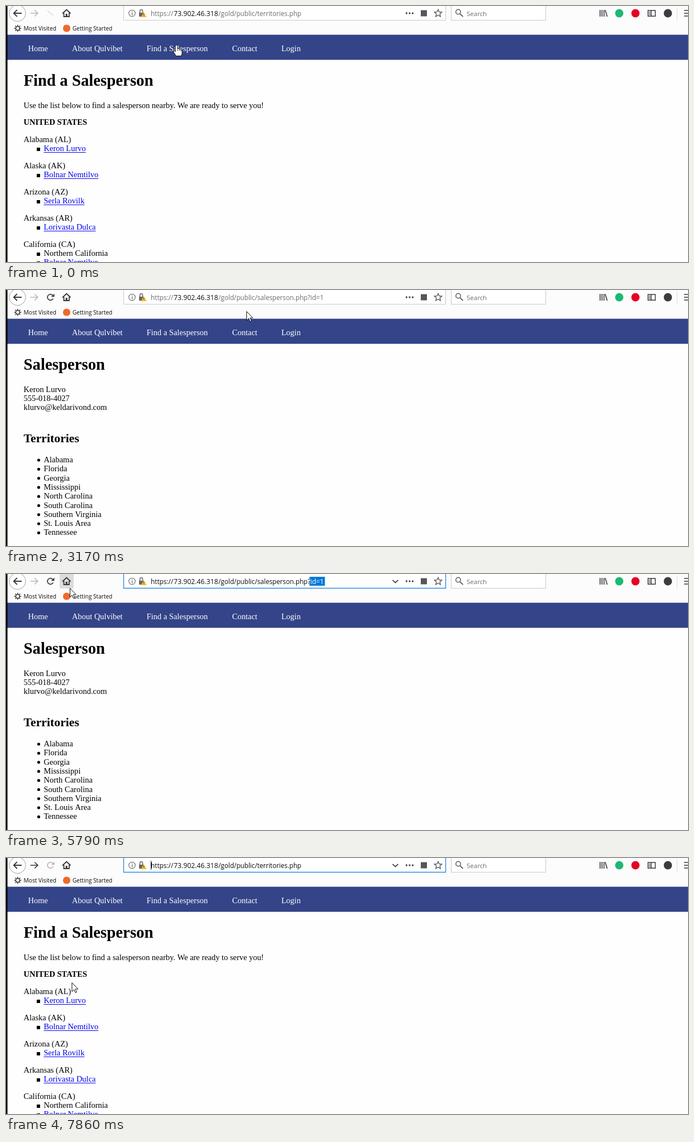
Write an HTML page with a canvas that moves like this. It is 1220 px wide and 459 px high and loops after 8 s.

```html
<!DOCTYPE html>
<html lang="en">
<head>
<meta charset="utf-8">
<title>Find a Salesperson</title>
<style>
html, body { margin: 0; width: 100%; height: 100%; overflow: hidden; background: #fefefe; }
canvas { display: block; }
</style>
</head>
<body>
<canvas id="stage" width="1220" height="459"></canvas>
<script>
const ctx = document.getElementById('stage').getContext('2d');
const LOOP = 8000;
const SERIF = '"Liberation Serif", serif';
const SANS = '"Open Sans", sans-serif';
const DARK = '#38383d', GREY = '#b8b8bb', BLUE = '#0078d7';

// Step tables: each row holds from its time until the next row.
const CURSOR = [
  [0, 305, 70, 'hand'], [150, 245, 112, 'arrow'], [290, 168, 158, 'arrow'],
  [430, 118, 190, 'arrow'], [570, 93, 208, 'beam'],
  [850, 98, 219, 'arrow'], [990, 104, 234, 'beam'], [1140, 111, 252, 'hand'],
  [1280, 115, 262, 'hand'], [1420, 116, 264, 'hand'], [1570, 116, 259, 'hand'],
  [2250, 118, 259, 'beam'], [2500, 136, 170, 'arrow'], [2650, 190, 78, 'arrow'],
  [2920, 300, 56, 'arrow'], [3050, 430, 38, 'arrow'], [3190, 540, 27, 'arrow'],
  [3320, 576, 20, 'beam'], [4580, 573, 20, 'beam'], [4710, 568, 20, 'beam'],
  [4840, 562, 20, 'beam'], [4980, 556, 20, 'beam'], [5110, 549, 20, 'beam'],
  [5240, 545, 20, 'beam'], [5640, 270, 24, 'arrow'], [5790, 114, 25, 'arrow'],
  [6070, 108, 42, 'arrow'], [6210, 90, 53, 'arrow'], [6340, 62, 47, 'arrow'],
  [6470, 38, 34, 'arrow'], [6610, 22, 24, 'arrow'], [6740, 14, 17, 'arrow'],
  [7580, 38, 70, 'arrow'], [7720, 92, 176, 'arrow'], [7860, 117.5, 223, 'arrow']
];
const RELOAD = [
  [0, 'slash'], [150, 'idle'], [290, 'ready'], [1980, 'stop'], [2380, 'fading'],
  [2500, 'slash'], [2650, 'idle'], [2920, 'ready'], [7150, 'stop'],
  [7440, 'fading'], [7580, 'slash'], [7720, 'idle']
];
const SELECTION = [
  [0, 0], [3750, 259], [4280, 0], [4710, 563], [4840, 555.5], [4980, 555.5],
  [5110, 547], [5240, 543], [7150, 0]
];
const SHAPES = {
  arrow: new Path2D('M.5 .5V16.5L4.2 13L6.7 18.6L9 17.6L6.6 12H11.4Z'),
  hand: new Path2D('M-2 1.5Q-2 0 0 0Q2 0 2 1.5V6.5Q5 5.6 5.4 7.4Q7.8 6.8 8 8.6Q10 8.2 10 10.2V14Q10 17 8 19.5H-1Q-2 17 -5 13Q-6 10 -4 10L-2 12Z'),
  beam: new Path2D('M-3 -6.5H3M0 -6.5V6.5M-3 6.5H3')
};

const HOST = '73.902.46.318';
const PEOPLE = ['Keron Lurvo', 'Bolnar Nemtilvo', 'Serla Rovilk', 'Lorivasta Dulca'];
const STATES = ['Alabama (AL)', 'Alaska (AK)', 'Arizona (AZ)', 'Arkansas (AR)'];
const AREAS = ['Alabama', 'Florida', 'Georgia', 'Mississippi', 'North Carolina',
  'South Carolina', 'Southern Virginia', 'St. Louis Area', 'Tennessee'];
const NAV = [['Home', 39.5], ['About Qulvibet', 118], ['Find a Salesperson', 251.5],
  ['Contact', 404.5], ['Login', 492.5]];

const at = (table, t) => table.filter(row => row[0] <= t).pop();
const between = (t, from, to) => t >= from && t < to;

function rect(x, y, w, h, color) {
  ctx.fillStyle = color;
  ctx.fillRect(x, y, w, h);
}
function text(str, x, y, size, color, family = SERIF, weight = '') {
  ctx.font = `${weight} ${size}px ${family}`;
  ctx.fillStyle = color;
  ctx.fillText(str, x, y);
}
function dot(x, y, r, color) {
  ctx.fillStyle = color;
  ctx.beginPath();
  ctx.arc(x, y, r, 0, Math.PI * 2);
  ctx.fill();
}
function ring(x, y, r, color, width = 1, start = 0, end = Math.PI * 2) {
  ctx.strokeStyle = color;
  ctx.lineWidth = width;
  ctx.beginPath();
  ctx.arc(x, y, r, start, end);
  ctx.stroke();
}
function line(d, color = DARK, width = 1.5) {
  ctx.strokeStyle = color;
  ctx.lineWidth = width;
  ctx.stroke(new Path2D(d));
}
function shape(d, color) {
  ctx.fillStyle = color;
  ctx.fill(new Path2D(d));
}

function heading(str, y, size) {
  text(str, 31.5, y, size, '#000', SERIF, 'bold');
}
function squareItem(str, y, color) {
  rect(55, y - 6, 6, 6, '#000');
  text(str, 67.5, y, 14.5, color);
}
function link(str, y) {
  squareItem(str, y, '#0000ee');
  rect(67.5, y + 2, ctx.measureText(str).width, 1, '#0000ee');
}

function listPage() {
  heading('Find a Salesperson', 143, 28.8);
  text('Use the list below to find a salesperson nearby. We are ready to serve you!',
    31.5, 182.5, 14.45, '#000');
  heading('UNITED STATES', 213, 14.5);
  STATES.forEach((state, i) => {
    text(state, 31.5, 244 + i * 47, 14.5, '#000');
    link(PEOPLE[i], 260 + i * 47);
  });
  text('California (CA)', 31.5, 432, 14.5, '#000');
  squareItem('Northern California', 448, '#000');
  link(PEOPLE[1], 464);
}

function personPage() {
  heading('Salesperson', 143, 28.8);
  [PEOPLE[0], '555-018-4027', 'klurvo@keldarivond.com'].forEach((row, i) =>
    text(row, 31.5, 182.7 + i * 16.3, 14.5, '#000'));
  heading('Territories', 273, 21.75);
  AREAS.forEach((area, i) => {
    const y = 309 + i * 16.3;
    dot(58.5, y - 4, 2.6, '#000');
    text(area, 67.5, y, 14.5, '#000');
  });
}

function addressText(t, pathColor, hostColor) {
  const person = between(t, 2250, 7150);
  text('https://', 259, 18, 11.8, pathColor, SANS);
  text(HOST, 300, 18, 12.2, hostColor, SANS);
  text('/gold/public/' + (person ? 'salesperson.php?' : 'territories.php'), 380, 18, 11.7, pathColor, SANS);
  if (person) text('id=1', 544.5, 18, 11.9, pathColor, SANS);
}

function addressBar(t) {
  const focused = t >= 3750;
  rect(210, 0, 577, 26, '#fff');
  line('M210.5 0V25.5H786.5V0', focused ? '#2f8be0' : t >= 3320 ? '#a5a5a8' : '#c9c9cb', focused ? 1.4 : 1);

  ring(225.5, 13, 5.8, '#66666a', 1.1);
  rect(225, 12, 1.3, 4.5, '#66666a');
  rect(225, 9.5, 1.3, 1.4, '#66666a');
  line('M239.5 13V9.5Q239.5 6.5 242 6.5Q244.5 6.5 244.5 9.5V12', '#66666a', 1.5);
  rect(238, 12, 8, 7, '#66666a');
  shape('M246.5 11L251.5 20H241.5Z', '#f5b921');
  rect(246, 14, 1, 3, '#5a4200');

  addressText(t, focused ? '#0c0c0d' : '#6c6c70', '#0c0c0d');
  const left = at(SELECTION, t)[1];
  if (left) {
    ctx.save();
    ctx.beginPath();
    ctx.rect(left, 5, 570.5 - left, 16);
    ctx.clip();
    rect(left, 5, 571 - left, 16, BLUE);
    addressText(t, '#fff', '#fff');
    ctx.restore();
  }
  if (between(t, 4280, 4580)) rect(569.5, 5, 1, 16, '#000');
  if (t >= 7720) rect(259, 5, 1, 16, '#000');

  if (t >= 3320) line('M691.5 11L696.5 15.5L701.5 11', '#4a4a4f', 1.7);
  [716.5, 722, 727.5].forEach(x => dot(x, 13, 1.7, '#4a4a4f'));
  rect(742, 7.5, 11, 11, '#55555a');
  star(773, 13.3);
}

function star(x, y) {
  ctx.beginPath();
  for (let i = 0; i < 10; i++) {
    const a = -Math.PI / 2 + i * Math.PI / 5, r = i % 2 ? 3.2 : 7;
    ctx.lineTo(x + r * Math.cos(a), y + r * Math.sin(a));
  }
  ctx.closePath();
  ctx.strokeStyle = '#4a4a4f';
  ctx.lineWidth = 1.3;
  ctx.stroke();
}

function reloadButton(state) {
  if (state === 'slash') return line('M74 8L84 17', GREY, 1);
  if (state === 'stop' || state === 'fading')
    return line('M74 8L84.5 18M84.5 8L74 18', state === 'stop' ? '#828286' : GREY, 1.5);
  const color = state === 'ready' ? DARK : GREY;
  ring(79.5, 13, 5.3, color, 1.7, 0.45, Math.PI * 1.78);
  shape('M86.5 6.5V12.3H80.7Z', color);
}

function toolbar(t) {
  rect(0, 0, 1220, 51, '#fcfcfc');

  dot(20.5, 13, 14.5, between(t, 7020, 7150) ? '#dedee0' : '#fff');
  ring(20.5, 13, 14.7, '#a2a2a5');
  line('M28 13H14M19.8 7L13.8 13L19.8 19', DARK, 1.8);
  line('M43.5 13H57M51.2 7.5L56.8 13L51.2 18.5', t >= 7020 ? DARK : GREY, 1.7);
  reloadButton(at(RELOAD, t)[1]);

  if (between(t, 5790, 6070)) {
    ctx.fillStyle = '#dcdcde';
    ctx.beginPath();
    ctx.roundRect(96, -3, 25, 29, 2);
    ctx.fill();
  }
  line('M101 13.5L108.3 6.5L115.6 13.5M103.5 12.5V19H113V12.5', DARK, 1.8);
  rect(106.8, 14, 3, 5, DARK);

  addressBar(t);

  rect(796, 0, 170, 26, '#fff');
  line('M796.5 0V25.5H965.5V0', '#c9c9cb', 1);
  ring(809, 10.5, 4.3, '#59595d', 1.5);
  line('M812 13.8L817.5 19', '#59595d', 1.8);
  text('Search', 824, 18, 11.5, '#6c6c70', SANS);

  line('M1062.7 7V19M1066.2 7V19M1069.7 7V19M1071.8 7.3L1075.5 19', DARK, 1.6);
  dot(1097, 13, 7.4, '#1bb971');
  dot(1126, 13, 7.4, '#e60023');
  line('M1148.5 8H1161.5V18.3H1148.5ZM1154 8V18.3', DARK, 1.5);
  line('M1150 11H1152.7M1150 13.3H1152.7M1150 15.6H1152.7', DARK, 1);
  const busy = between(t, 1980, 2380) || between(t, 7020, 7440);
  dot(1184, 13, 7.4, busy ? '#de5833' : '#3c3c40');
  rect(1200, 2, 1, 23, '#d9d9db');
  line('M1213 8H1220M1213 13H1220M1213 18H1220', DARK, 1.6);

  ring(21, 40, 3.5, DARK, 1.6);
  for (let i = 0; i < 8; i++) {
    const a = i * Math.PI / 4, c = Math.cos(a), s = Math.sin(a);
    line(`M${21 + 4 * c} ${40 + 4 * s}L${21 + 6.3 * c} ${40 + 6.3 * s}`, DARK, 1.5);
  }
  text('Most Visited', 31.5, 44, 10.25, '#0c0c0d', SANS);
  dot(108.5, 40, 6.6, '#ef6a2c');
  text('Getting Started', 119, 44, 10.1, '#0c0c0d', SANS);
}

function cursor(t) {
  const [, x, y, kind] = at(CURSOR, t);
  ctx.save();
  ctx.translate(x, y);
  ctx.lineWidth = 1;
  ctx.strokeStyle = '#111';
  if (kind !== 'beam') {
    ctx.fillStyle = '#fff';
    ctx.fill(SHAPES[kind]);
  }
  ctx.stroke(SHAPES[kind]);
  if (kind === 'hand') line('M2 6.5V10.5M5.4 7.5V10.5M8 9V11.5', '#111', 0.8);
  ctx.restore();
}

function draw(t) {
  rect(0, 0, 1220, 459, '#fefefe');
  toolbar(t);
  rect(0, 51.5, 1220, 45, '#334488');
  NAV.forEach(([label, x]) => text(label, x, 80.5, 14.5, '#fff'));
  if (between(t, 2250, 7440)) personPage();
  else listPage();
  rect(0, 0, 2.6, 459, '#000');
  cursor(t);
}

function tick() {
  draw(performance.now() % LOOP);
  requestAnimationFrame(tick);
}
tick();
</script>
</body>
</html>
```
